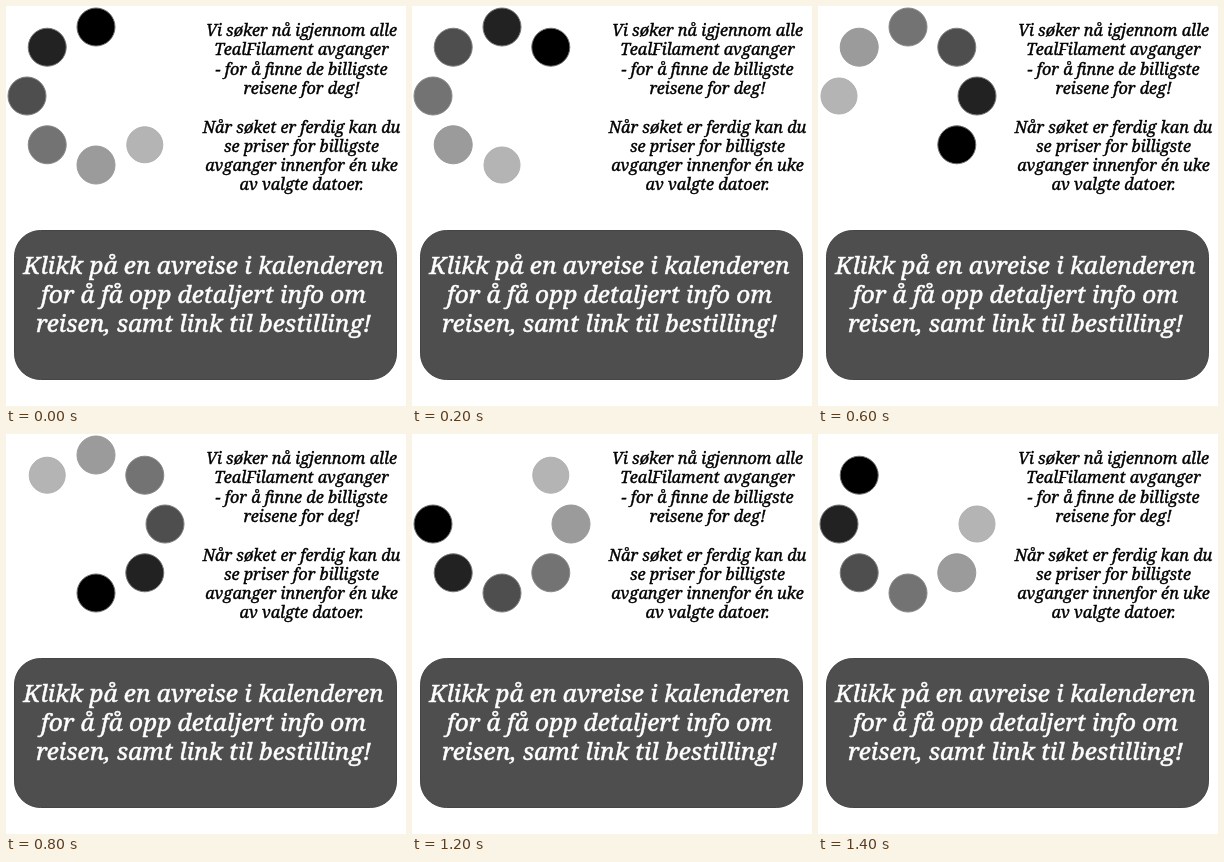
Recreate the animation shown at these times as an HTML page. Size 400 by 400 pixels, loop 1.6 s.

```html
<!DOCTYPE html>
<html lang="no">
<head>
<meta charset="utf-8">
<style>
  html, body { margin: 0; width: 100%; height: 100%; overflow: hidden; background: #fff; }
  svg { display: block; width: 400px; height: 400px; }
  text { font-family: "Noto Serif", serif; font-style: italic; text-anchor: middle; }
  #intro { font-size: 16.3px; fill: #000; stroke: #000; stroke-width: .4; }
  #hint { font-size: 24.4px; fill: #fff; stroke: #fff; stroke-width: .5; }
</style>
</head>
<body>
<svg viewBox="0 0 400 400">
  <g id="dots"></g>
  <g id="intro"></g>
  <rect x="8.5" y="224.5" width="382" height="149" rx="26" fill="#4e4e4e" stroke="#454545"/>
  <g id="hint"></g>
</svg>
<script>
const STEP = 200, COUNT = 8;
const shades = ['#000', '#222', '#4e4e4e', '#737373', '#9b9b9b', '#b4b4b4'];
const rims = ['#707070', '#777', '#808080', '#888', '#999', '#b0b0b0'];

function add(parent, tag, attrs) {
  const el = document.createElementNS('http://www.w3.org/2000/svg', tag);
  for (const key in attrs) el.setAttribute(key, attrs[key]);
  return parent.appendChild(el);
}

function addLines(id, x, y, pitch, lines) {
  const group = document.getElementById(id);
  lines.forEach((line, i) => {
    add(group, 'text', { x, y: y + i * pitch }).textContent = line;
  });
}

addLines('intro', 295.5, 30, 19.3, [
  'Vi søker nå igjennom alle',
  'TealFilament avganger',
  '- for å finne de billigste',
  'reisene for deg!',
  '',
  'Når søket er ferdig kan du',
  'se priser for billigste',
  'avganger innenfor én uke',
  'av valgte datoer.'
]);

addLines('hint', 197.5, 267.5, 29.3, [
  'Klikk på en avreise i kalenderen',
  'for å få opp detaljert info om',
  'reisen, samt link til bestilling!'
]);

const ring = document.getElementById('dots');
const dots = Array.from({ length: COUNT }, (_, i) => {
  const angle = i * 2 * Math.PI / COUNT;
  return add(ring, 'circle', {
    cx: 90 + 69 * Math.sin(angle),
    cy: 90 - 69 * Math.cos(angle)
  });
});

function draw(now) {
  const head = Math.floor(now / STEP) % COUNT;
  dots.forEach((dot, i) => {
    const age = (head - i + COUNT) % COUNT;
    const shown = age < shades.length;
    dot.setAttribute('visibility', shown ? 'visible' : 'hidden');
    if (!shown) return;
    dot.setAttribute('r', age === shades.length - 1 ? 18 : 19);
    dot.setAttribute('fill', shades[age]);
    dot.setAttribute('stroke', rims[age]);
  });
}

const start = performance.now();
function tick() {
  draw(performance.now() - start);
  requestAnimationFrame(tick);
}
tick();
</script>
</body>
</html>
```
